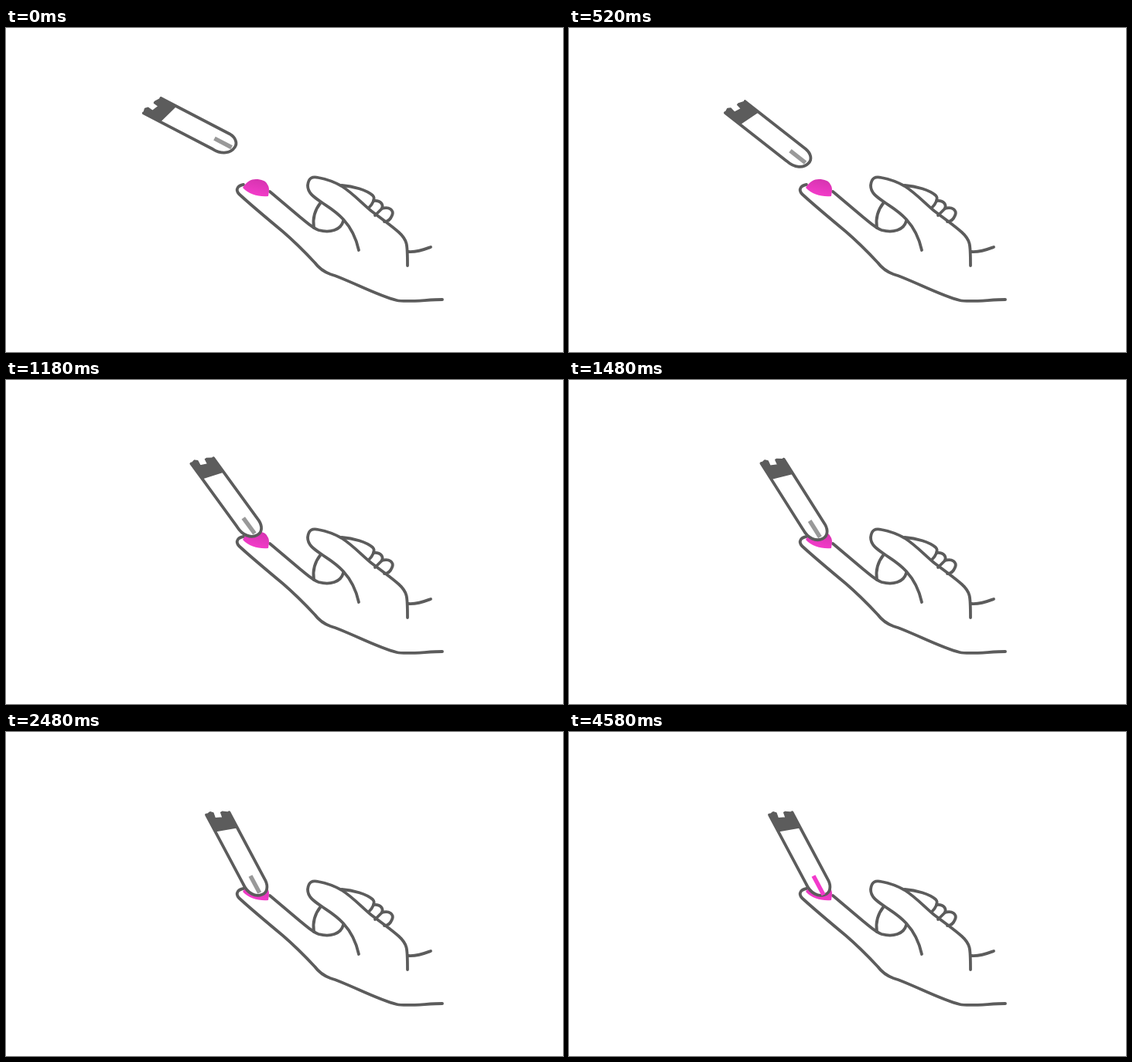
Write an HTML page with a canvas that moves like this. It is 720 by 420 pixels and loops after 5.14 s.

```html
<!DOCTYPE html>
<html lang="en">
<head>
<meta charset="utf-8">
<title>Test strip</title>
<style>
html, body { margin: 0; width: 100%; height: 100%; overflow: hidden; background: #fff; }
canvas { display: block; width: 720px; height: 420px; }
</style>
</head>
<body>
<canvas id="stage" width="720" height="420"></canvas>
<script>
const ctx = document.getElementById('stage').getContext('2d');
const LOOP = 5140, STEP = 20;
const INK = '#5c5c5c', GREY = [153, 153, 153], PINK = [242, 58, 203];

const hand = [
  // index finger underside, palm and wrist
  'M307 203C300 204 296 209 301 215C316 229 340 249 358 264C373 277 386 290 399 304' +
    'C405 312 411 316 419 319C442 326 480 347 505 353C518 356 545 352 564 352',
  // index finger top and web
  'M341 212L380 245C390 253 396 259 404 262C419 266 433 262 436 250',
  'M407 226C399 236 396 247 398 259',
  // thumb and back of the hand
  'M456 288C453 274 446 259 436 248C426 237 415 231 408 226C396 218 390 213 390 204' +
    'C391 194 396 192 404 194C415 196 427 201 434 205C448 214 460 227 472 237' +
    'C485 247 498 256 508 265C519 275 519 280 519 308',
  // curled fingers
  'M434 204C449 205 466 210 474 217C478 221 474 228 469 233',
  'M475 224C485 223 489 230 485 235L477 243',
  'M486 234C495 231 502 236 499 243C497 248 493 251 489 251',
  'M520 290C531 291 541 287 549 284'
].map(d => new Path2D(d));

const drop = new Path2D('M306 207C311 199 317 196 323 196C330 196 336 198 338 203C341 207 340 212 339 218C327 219 314 216 306 207Z');

// Strip space: x runs towards the rounded tip, origin at the upper head corner.
const outline = new Path2D('M0 -.5L100 -.5C109 0 115 5 114 12C113 21 104 28 90 27L-11 27');
const head = new Path2D('M0 -.5L22 -.5L13 27L-11 27L-12 21L-9 18L-2 19L2 10L-5 9L-5 7Z');

const lerp = (a, b, p) => a + (b - a) * p;
const mix = (a, b, p) => `rgb(${a.map((v, i) => Math.round(lerp(v, b[i], p)))})`;

const dropShade = ctx.createLinearGradient(326, 196, 321, 218);
dropShade.addColorStop(0, '#d634b0');
dropShade.addColorStop(1, '#f53ccb');

// cubic-bezier(.25, .1, .25, 1)
function ease(x) {
  if (x <= 0) return 0;
  if (x >= 1) return 1;
  const curve = (a, b, s) => 3 * a * s * (1 - s) ** 2 + 3 * b * s * s * (1 - s) + s ** 3;
  let lo = 0, hi = 1;
  for (let i = 0; i < 24; i++) {
    const mid = (lo + hi) / 2;
    if (curve(.25, .25, mid) < x) lo = mid; else hi = mid;
  }
  return curve(.1, 1, lo);
}

function drawHand() {
  hand.forEach(line => ctx.stroke(line));
  ctx.fillStyle = dropShade;
  ctx.fill(drop);
}

function drawStrip(p, soak) {
  ctx.save();
  ctx.translate(lerp(200, 288, p), lerp(91.5, 104.5, p));
  ctx.rotate(lerp(27.5, 62, p) * Math.PI / 180);
  ctx.fillStyle = '#fff';
  ctx.fill(outline);
  ctx.stroke(outline);
  ctx.fillStyle = INK;
  ctx.fill(head);
  ctx.lineWidth = 1.5;
  ctx.stroke(head);
  ctx.fillStyle = mix(GREY, PINK, soak);
  ctx.fillRect(85.5, 11, lerp(25, 28, soak), 5.5);
  ctx.restore();
}

function render(now) {
  const t = Math.floor(now % LOOP / STEP) * STEP;
  ctx.setTransform(1, 0, 0, 1, 0, 0);
  ctx.fillStyle = '#fff';
  ctx.fillRect(0, 0, 720, 420);
  ctx.lineCap = ctx.lineJoin = 'round';
  ctx.strokeStyle = INK;
  ctx.lineWidth = 3.8;
  drawHand();
  drawStrip(ease(t / 2520), ease((t - 2560) / 2020));
}

const start = performance.now();
function tick() {
  render(performance.now() - start);
  requestAnimationFrame(tick);
}
tick();
</script>
</body>
</html>
```
